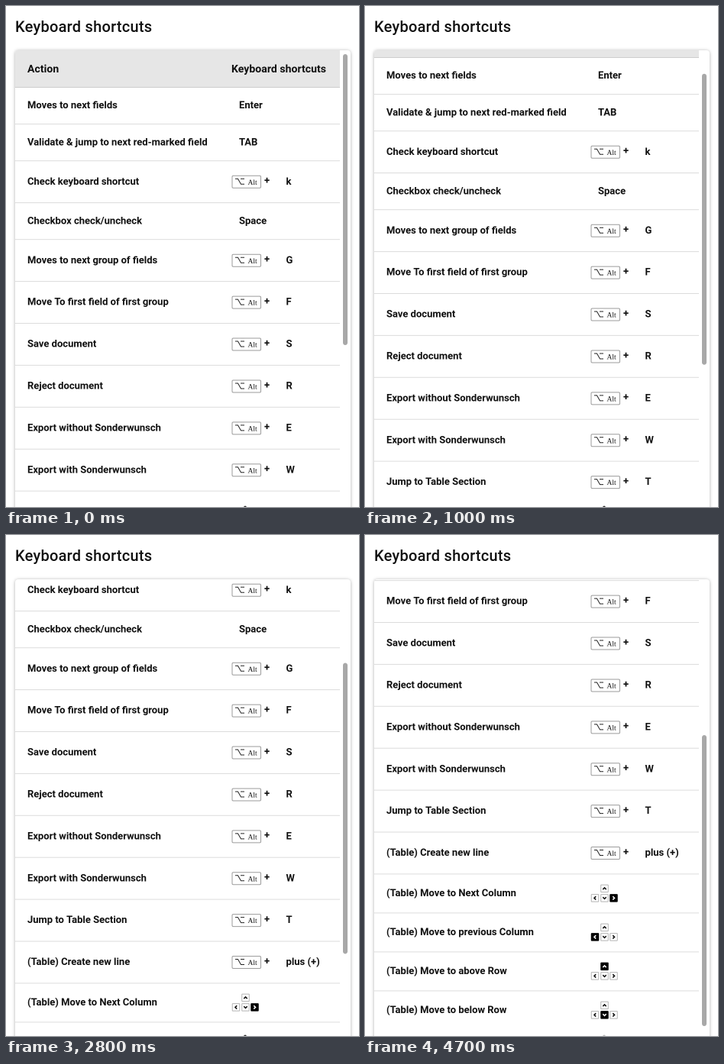
Recreate the animation shown at these times as an HTML page with a canvas. Size 462 by 656 pixels, loop 4800 ms.

```html
<!DOCTYPE html>
<html lang="en">
<head>
<meta charset="utf-8">
<title>Keyboard shortcuts</title>
<style>
  html, body { margin: 0; width: 100%; height: 100%; overflow: hidden; background: #fff; }
  canvas { display: block; width: 462px; height: 656px; }
</style>
</head>
<body>
<canvas id="stage" width="924" height="1312"></canvas>
<script>
const ctx = document.getElementById('stage').getContext('2d');
// The backing store is twice the stage size, so half-pixel positions stay crisp.
const DENSITY = 2;
ctx.scale(DENSITY, DENSITY);

const LOOP = 4800, TICK = 100;
const CARD = { left: 12, top: 58, right: 451, bottom: 647 };
const ROW_RIGHT = 437, HEADER_END = 106;
const INK = '#111';

// Scroll gestures: start time, then the offset reached on each tick.
const gestures = [
  { start: 100, offsets: [1, 2, 4, 6, 8, 10, 13, 20, 29, 39, 48, 54] },
  { start: 1900, offsets: [60, 76, 98, 115] },
  { start: 2400, offsets: [118, 126, 137, 148, 158, 163] },
  { start: 3300, offsets: [170, 192, 224, 268, 301] }
];

const plain = (label, key) => ({ label, key, height: 48.1 });
const alt = (label, key) => ({ label, key, height: 54.9, alt: true });
const arrow = (label, active) => ({ label, active, height: 51 });

const rows = [
  plain('Moves to next fields', 'Enter'),
  plain('Validate & jump to next red-marked field', 'TAB'),
  alt('Check keyboard shortcut', 'k'),
  plain('Checkbox check/uncheck', 'Space'),
  alt('Moves to next group of fields', 'G'),
  alt('Move To first field of first group', 'F'),
  alt('Save document', 'S'),
  alt('Reject document', 'R'),
  alt('Export without Sonderwunsch', 'E'),
  alt('Export with Sonderwunsch', 'W'),
  alt('Jump to Table Section', 'T'),
  alt('(Table) Create new line', 'plus (+)'),
  arrow('(Table) Move to Next Column', 'right'),
  arrow('(Table) Move to previous Column', 'left'),
  arrow('(Table) Move to above Row', 'up'),
  arrow('(Table) Move to below Row', 'down')
];

const arrowKeys = {
  up: { x: 313.5, y: -6, angle: 0 },
  left: { x: 301, y: 6.5, angle: -Math.PI / 2 },
  down: { x: 313.5, y: 6.5, angle: Math.PI },
  right: { x: 325.5, y: 6.5, angle: Math.PI / 2 }
};

function scrollAt(time) {
  let offset = 0;
  for (const { start, offsets } of gestures) {
    if (time < start) break;
    const tick = Math.floor((time - start) / TICK);
    offset = offsets[Math.min(tick, offsets.length - 1)];
  }
  return offset;
}

function text(str, x, y, font = 'bold 13px Roboto, sans-serif', spacing = '0px') {
  ctx.font = font;
  ctx.letterSpacing = spacing;
  ctx.fillStyle = INK;
  ctx.fillText(str, x, y);
}

function line(points, color, width) {
  ctx.beginPath();
  points.forEach(([x, y]) => ctx.lineTo(x, y));
  ctx.strokeStyle = color;
  ctx.lineWidth = width;
  ctx.stroke();
}

function box(x, y, w, h, radius, fill, stroke) {
  ctx.beginPath();
  ctx.roundRect(x, y, w, h, radius);
  ctx.fillStyle = fill;
  ctx.fill();
  if (stroke) {
    ctx.strokeStyle = stroke;
    ctx.lineWidth = 1;
    ctx.stroke();
  }
}

function drawAltKey(base) {
  box(296, base - 11.5, 37.5, 16, 1.5, '#fff', '#9c9c9c');
  line([[300, base - 7.5], [303.5, base - 7.5], [307.5, base - 0.5], [312, base - 0.5]], '#222', 1);
  line([[307, base - 7.5], [312, base - 7.5]], '#222', 1);
  text('Alt', 316.5, base, '9.5px "Liberation Serif", serif');
  text('+', 338, base - 1.2);
}

function drawArrowKeys(center, active) {
  for (const [name, { x, y, angle }] of Object.entries(arrowKeys)) {
    const on = name === active;
    ctx.save();
    ctx.translate(x, center + y);
    box(-4.75, -4.75, 9.5, 9.5, 0.5, on ? '#000' : '#fff', on ? '#000' : '#b4b4b4');
    ctx.rotate(angle);
    line([[-2.2, 1.2], [0, -1], [2.2, 1.2]], on ? '#fff' : INK, 1.6);
    ctx.restore();
  }
}

function drawRow(row, top, isLast) {
  const center = top + row.height / 2;
  const base = center + 4.1;
  text(row.label, 28, base);
  if (row.active) drawArrowKeys(center, row.active);
  else if (row.alt) drawAltKey(base);
  if (row.key) text(row.key, row.alt ? 366.5 : 305, base);
  if (!isLast) {
    ctx.fillStyle = '#dcdcdc';
    ctx.fillRect(CARD.left, top + row.height, ROW_RIGHT - CARD.left, 1);
  }
}

function drawCard() {
  ctx.save();
  ctx.shadowColor = 'rgba(0,0,0,0.32)';
  ctx.shadowBlur = 4 * DENSITY;
  ctx.shadowOffsetY = 0.5 * DENSITY;
  box(CARD.left, CARD.top, CARD.right - CARD.left, 640, 4, '#fff');
  ctx.restore();
}

function drawTable(scroll) {
  ctx.save();
  ctx.beginPath();
  ctx.roundRect(CARD.left, CARD.top, CARD.right - CARD.left, CARD.bottom - CARD.top, [4, 4, 0, 0]);
  ctx.clip();

  const width = ROW_RIGHT - CARD.left;
  ctx.fillStyle = '#e6e6e6';
  ctx.fillRect(CARD.left, CARD.top - scroll, width, HEADER_END - CARD.top);
  ctx.fillStyle = '#cdcdcd';
  ctx.fillRect(CARD.left, HEADER_END - scroll, width, 1);
  const headerFont = 'bold 14px Roboto, sans-serif';
  text('Action', 28, 87 - scroll, headerFont, '0.05px');
  text('Keyboard shortcuts', 295, 87 - scroll, headerFont, '0.05px');

  let top = HEADER_END - scroll;
  rows.forEach((row, i) => {
    drawRow(row, top, i === rows.length - 1);
    top += row.height;
  });

  box(441, 63 + scroll * 0.661, 6, 381, 3, '#a8a8a8');
  ctx.restore();
}

function draw(time) {
  ctx.fillStyle = '#fff';
  ctx.fillRect(0, 0, 462, 656);
  text('Keyboard shortcuts', 12, 34, '500 20px Roboto, sans-serif', '0.25px');
  drawCard();
  drawTable(scrollAt(time));
  // Tip of the arrow peeking in below the list.
  line([[311, 656.6], [313, 655], [315, 656.6]], time < 4700 ? '#333' : '#bbb', 1.2);
}

function frame(now) {
  draw(now % LOOP);
  requestAnimationFrame(frame);
}
requestAnimationFrame(frame);
</script>
</body>
</html>
```
